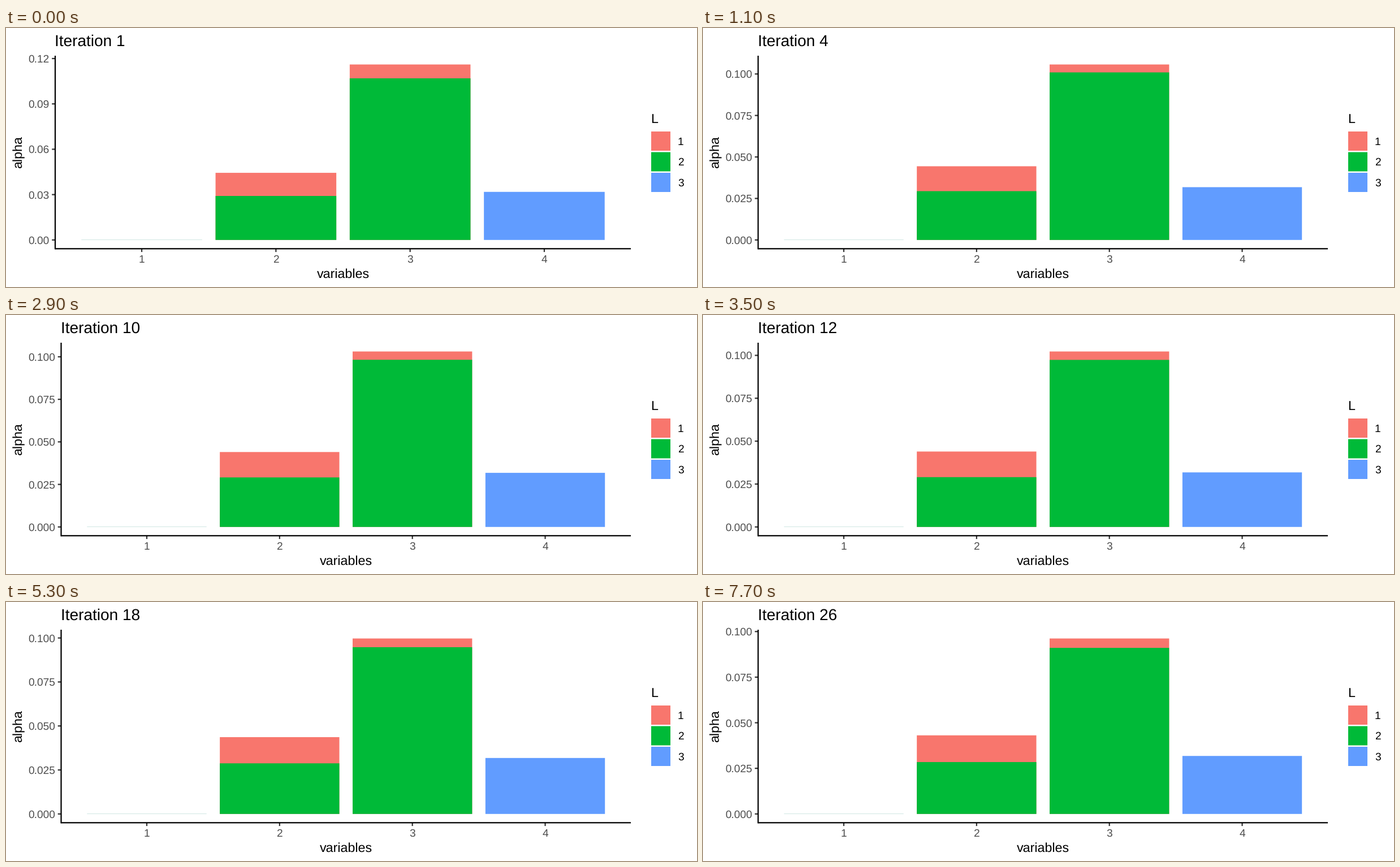
Animation, 1222 px wide and 458 px high, one loop 8 s. Source, as a matplotlib script:

```python
import numpy as np
import matplotlib.pyplot as plt
from matplotlib.animation import FuncAnimation
from matplotlib.lines import Line2D
from matplotlib.patches import Rectangle

W, H, DPI = 1222, 458, 100
TOP, BASE, RIGHT = 49.0, 390.3, 1105.0
SPAN = (BASE - TOP) / 1.1          # height of the tallest bar
ZERO = BASE - 0.05 * SPAN
RED, GREEN, BLUE = "#F8766D", "#00BA38", "#619CFF"
SMALL, MEDIUM, LARGE = 19.2, 23.2, 28
TICK = 5.8

# bar heights at a few iterations, linear in between
KNOTS = [1, 2, 4, 10, 15, 18, 22, 26]
GREEN2 = [.0291, .0295, .0294, .0291, .0289, .02876, .02862, .02844]
TOTAL2 = [.0444, .0445, .0444, .04403, .04384, .04364, .0434, .04309]
GREEN3 = [.1069, .1019, .10095, .09824, .09603, .09476, .09293, .09105]
TOTAL3 = [.11607, .1066, .10572, .10312, .10098, .09971, .09795, .0962]
BLUE4 = .0318

plt.rcParams["font.family"] = "Liberation Sans"
plt.rcParams["text.hinting"] = "none"
fig = plt.figure(figsize=(W / DPI, H / DPI), dpi=DPI, facecolor="white")
ax = fig.add_axes([0, 0, 1, 1])
ax.set_xlim(0, W)
ax.set_ylim(H, 0)
ax.axis("off")


def pt(px):
    return px * 72 / DPI


def text(x, y, s, size, color="black", **kw):
    return ax.text(x, y, s, fontsize=pt(size), color=color, va="baseline", **kw)


def rect(color, x=0, y=0, w=0, h=0):
    return ax.add_patch(Rectangle((x, y), w, h, fc=color, lw=0, snap=False))


def line(color="black"):
    return ax.add_line(Line2D([], [], color=color, lw=pt(2.25), snap=False,
                              solid_capstyle="butt"))


# legend
text(1140, 168, "L", MEDIUM)
for k, color in enumerate((RED, GREEN, BLUE)):
    rect(color, 1141, 183 + 36.5 * k, 34, 34)
    text(1188, 207 + 36.4 * k, str(k + 1), SMALL)

# artists that follow the data
text(28.6, (TOP + BASE) / 2, "alpha", MEDIUM, rotation=90,
     rotation_mode="anchor", ha="center")
xtitle = text(0, 441.6, "variables", MEDIUM, ha="center")
title = text(0, 31.8, "", LARGE)
bars = [(2, rect(RED)), (2, rect(GREEN)), (3, rect(RED)), (3, rect(GREEN)),
        (4, rect(BLUE))]
flat = rect("#CFE6E3")
xticks = [(line("#333333"), text(0, 415.2, str(v), SMALL, "#4D4D4D"))
          for v in range(1, 5)]
yticks = [(line("#333333"), text(38.9, 0, "", SMALL, "#4D4D4D"))
          for _ in range(5)]
xaxis, yaxis = line(), line()


def draw(i):
    it = 1 if i < 5 else 2 + (i - 5) // 3
    g2, t2, g3, t3 = (np.interp(it, KNOTS, v)
                      for v in (GREEN2, TOTAL2, GREEN3, TOTAL3))
    step, fmt, left = (.03, ".2f", 87.0) if it == 1 else (.025, ".3f", 97.5)
    unit = (RIGHT - left) / 4.29
    scale = SPAN / t3

    def px(v):
        return left + (v - 0.355) * unit

    for (v, bar), value in zip(bars, (t2, g2, t3, g3, BLUE4)):
        h = value * scale
        bar.set_bounds(px(v - 0.45), ZERO - h, 0.9 * unit, h)
    flat.set_bounds(px(0.55), 374, 0.9 * unit, 1)

    for v, (mark, label) in enumerate(xticks, 1):
        mark.set_data([px(v)] * 2, [BASE, BASE + TICK])
        label.set_x(px(v) - 0.278 * SMALL)
    for k, (mark, label) in enumerate(yticks):
        y = ZERO - k * step * scale
        mark.set_data([left - TICK, left], [y, y])
        label.set_y(y + 6.8)
        label.set_text(format(k * step, fmt))

    xaxis.set_data([left, RIGHT], [BASE, BASE])
    yaxis.set_data([left, left], [TOP, BASE + 1.1])
    xtitle.set_x((left + RIGHT) / 2)
    title.set_x(left - 0.7)
    title.set_text(f"Iteration {it}")
    return []


anim = FuncAnimation(fig, draw, frames=80, interval=100, repeat=True,
                     repeat_delay=0, blit=False)
plt.show()
```
